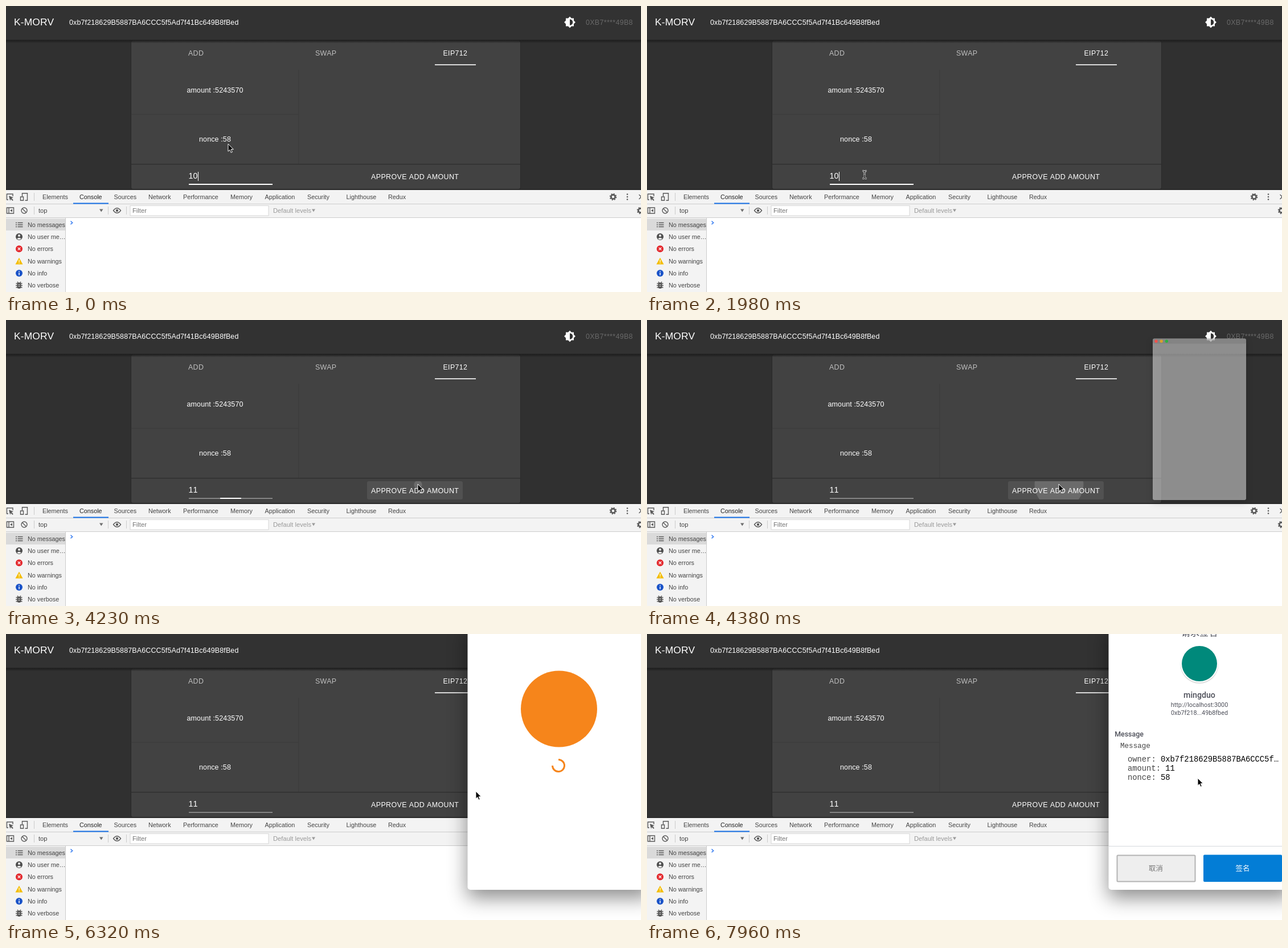
An HTML page for the animation above (8000 ms loop, 1115 px wide and 502 px high).

```html
<!DOCTYPE html>
<html lang="en">
<head>
<meta charset="utf-8">
<title>Token approval demo</title>
<style>
html, body { margin: 0; width: 100%; height: 100%; overflow: hidden; background: #303030; }
svg { display: block; width: 1115px; height: 502px; }
text { font-family: "Liberation Sans", Arial, sans-serif; white-space: pre; }
.body { font-size: 12.5px; letter-spacing: .00938em; fill: #fff; }
.btn { font-size: 12.4px; letter-spacing: .02857em; fill: #fff; }
.dev { font-size: 10.8px; fill: #444; }
.robo { font-family: Roboto, sans-serif; fill: #4d4f59; text-anchor: middle; }
.mono { font-family: "Liberation Mono", "Courier New", monospace; fill: #444; }
.cjk { font-family: "Noto Sans CJK SC", "Noto Sans CJK", sans-serif; text-anchor: middle; font-weight: 500; }
.line { fill: none; stroke: #5a5a5a; stroke-width: 1.4; }
#popup { filter: drop-shadow(0 14px 17px rgba(0,0,0,.45)); }
#ghost { filter: drop-shadow(0 5px 6px rgba(0,0,0,.3)); }
</style>
</head>
<body>
<svg id="stage" viewBox="0 0 1115 502" xmlns="http://www.w3.org/2000/svg"></svg>
<script>
const LOOP = 8000;
const ADDRESS = "0xb7f218629B5887BA6CCC5f5Ad7f41Bc649B8fBed";

// Screen refreshes: [first, last, count]
const BURSTS = [
  [0, 0, 1], [150, 780, 5], [1080, 1980, 7], [2580, 2580, 1], [2880, 3780, 7],
  [3930, 4380, 4], [4680, 4680, 1], [4950, 5870, 6], [6020, 7060, 8], [7210, 7960, 6]
];

// Pointer path: [time, x, y]
const PATH = [
  [0, 390, 242], [150, 390, 235], [400, 389, 190], [640, 387, 153], [780, 387, 148],
  [1080, 386, 153], [1400, 383, 198], [1750, 382, 274], [1980, 382, 296],
  [3100, 382, 296], [3330, 440, 316], [3480, 560, 321], [3630, 676, 313],
  [3780, 716, 304], [3930, 722, 291], [4080, 723, 288], [5130, 723, 288],
  [5500, 780, 284], [5870, 822, 278], [6320, 825, 276], [6620, 825, 276],
  [7060, 838, 280], [7210, 888, 281], [7360, 924, 277], [7510, 940, 262],
  [7660, 952, 246], [7810, 961, 241], [7960, 967, 253]
];

const rect = (x, y, w, h, fill, extra = "") =>
  `<rect x="${x}" y="${y}" width="${w}" height="${h}" fill="${fill}" ${extra}/>`;
const circle = (x, y, r, fill, extra = "") =>
  `<circle cx="${x}" cy="${y}" r="${r}" fill="${fill}" ${extra}/>`;
const text = (x, y, cls, str, extra = "") =>
  `<text x="${x}" y="${y}" class="${cls}" ${extra}>${str}</text>`;
const path = (d, extra = 'class="line"') => `<path d="${d}" ${extra}/>`;
const group = (id, inner) => `<g id="${id}">${inner}</g>`;

const gear = (x, y) =>
  circle(x, y, 3.6, "none", 'stroke="#5a5a5a" stroke-width="2.6"') +
  circle(x, y, 5.4, "none", 'stroke="#5a5a5a" stroke-width="1.8" stroke-dasharray="2.12"');

const defs = `<defs>
  <linearGradient id="fall" x2="0" y2="1"><stop stop-color="#000" stop-opacity=".42"/><stop offset="1" stop-color="#000" stop-opacity="0"/></linearGradient>
  <clipPath id="inButton"><rect x="634" y="283" width="168" height="32" rx="3"/></clipPath>
</defs>`;

function header() {
  return rect(0, 0, 1115, 60, "#323232") +
    rect(0, 59.5, 1115, 6, "url(#fall)") +
    text(14, 34, "body", "K-MORV", 'style="font-size:17.4px"') +
    text(111, 33, "body", ADDRESS) +
    path("M20 15.31L23.31 12 20 8.69V4h-4.69L12 .69 8.69 4H4v4.69L.69 12 4 15.31V20h4.69L12 23.31 15.31 20H20zM12 18V6a6 6 0 0 1 0 12z",
      'fill="#fff" transform="translate(979.5 18) scale(.875)"') +
    text(1018, 33, "btn", "0XB7****49B8", 'style="fill:#696969"');
}

function card() {
  return rect(219, 61, 685, 261, "#292929", 'rx="4"') +
    rect(220, 61, 683, 260, "#424242", 'rx="3"') +
    rect(220, 61, 683, 4, "url(#fall)", 'opacity=".5"') +
    text(320, 87.3, "btn", "ADD", 'style="fill:#c0c0c0"') +
    text(543, 87.3, "btn", "SWAP", 'style="fill:#c0c0c0"') +
    text(767.5, 87.3, "btn", "EIP712") +
    rect(753, 102.4, 72, 1.6, "#fff") +
    rect(513, 112, 1.4, 165, "#3d3d3d") +
    rect(220, 189.5, 293, 1.4, "#3d3d3d") +
    text(317.5, 152, "body", "amount :5243570") +
    text(339, 238.3, "body", "nonce :58") +
    rect(220, 277, 683, 1.4, "#2f2f2f") +
    text(320.5, 303, "body", "10", 'id="amount" style="font-size:14.3px;letter-spacing:0;font-kerning:none"') +
    rect(337, 291, 1, 16, "#fff", 'id="caret"') +
    rect(321, 312.6, 147, 1, "#c6c6c6") +
    rect(321, 312, 147, 2, "#fff", 'id="focus"') +
    rect(634, 283, 168, 32, "#515151", 'rx="3" id="hover"') +
    circle(723.5, 289, 43, "#fff", 'id="ripple" opacity=".15" clip-path="url(#inButton)"') +
    text(641, 304, "btn", "APPROVE ADD AMOUNT", 'style="font-size:12.5px;font-kerning:none"');
}

function devtools() {
  const tabs = [[64, "Elements"], [129, "Console"], [189.5, "Sources"], [250, "Network"], [311, "Performance"],
    [394, "Memory"], [454.5, "Application"], [529, "Security"], [597.5, "Lighthouse"], [671, "Redux"]];
  const rows = ["No messages", "No user me…", "No errors", "No warnings", "No info", "No verbose"];
  const rowY = i => 383.7 + i * 21.3;
  const small = 'style="font-size:11.2px"';
  return rect(0, 321, 1115, 2, "#2a2a2a") +
    rect(0, 323, 1115, 179, "#fff") +
    rect(0, 323, 1115, 48.5, "#f3f3f3") +
    rect(0, 347, 1115, 1, "#cdcdcd") +
    rect(0, 371, 1115, 1, "#cdcdcd") +
    rect(118, 345.5, 62, 2, "#1a73e8") +
    tabs.map(([x, s]) => text(x, 339, "dev", s, s === "Console" ? 'style="fill:#222"' : "")).join("") +
    // toolbar icons
    path("M1 330h11v4M1 340h3M1.5 330v10") +
    path("M5 333l8 3.2-3.2 1.4 3 3-1.4 1.4-3-3-1.2 3z", 'fill="#5a5a5a"') +
    path("M28.5 334v-5.3h9v12.6h-4M25.5 335h5v6.3h-5z") +
    rect(49, 328, 1, 14, "#ccc") +
    gear(1066, 335) +
    [330.5, 335, 339.5].map(y => circle(1091, y, 1.3, "#5a5a5a")).join("") +
    path("M1111.5 331l8 8M1119.5 331l-8 8") +
    path("M1.5 354h12v10h-12zM5 354v10") +
    path("M11 356.5v5l-4-2.5z", 'fill="#5a5a5a"') +
    circle(32, 359, 5, "none", 'class="line"') + path("M28.5 355.5l7 7") +
    [49, 179, 211].map(x => rect(x, 352, 1, 14, "#ccc")).join("") +
    text(57, 363, "dev", "top", small) +
    path("M164 356.5h6.5l-3.25 5z", 'fill="#6e6e6e"') +
    path("M188.5 359q6.5-8.5 13 0q-6.5 8.5-13 0z") + circle(195, 359, 2.2, "#5a5a5a") +
    rect(218, 350.5, 243, 17.5, "#fff", 'stroke="#d6d6d6"') +
    text(222, 363, "dev", "Filter", 'style="font-size:11.2px;fill:#757575"') +
    text(469, 363, "dev", "Default levels", 'style="font-size:11.2px;fill:#9a9a9a"') +
    path("M537 356.5h6l-3 5z", 'fill="#9a9a9a"') +
    gear(1114, 359) +
    // sidebar
    rect(0, 372, 104, 130, "#f3f3f3") + rect(0, 373.5, 104, 20.5, "#dadada") +
    rect(104, 372, 1, 130, "#ccc") +
    rows.map((s, i) => text(38, rowY(i) + 4, "dev", s)).join("") +
    path("M17 380.5h2M20.5 380.5h9M17 384h2M20.5 384h9M17 387.5h2M20.5 387.5h9") +
    circle(23, rowY(1), 6, "#4f4f4f") + circle(23, rowY(1) - 2, 2, "#f3f3f3") +
    path("M19.2 408.5q3.8-3.5 7.6 0q-3.8 3.2-7.6 0z", 'fill="#f3f3f3"') +
    circle(23, rowY(2), 6, "#e3282d") +
    path("M20.7 424l4.6 4.6M25.3 424l-4.6 4.6", 'stroke="#fff" stroke-width="1.3"') +
    path("M23 441.7l6.5 11.8h-13z", 'fill="#f4bd00"') +
    rect(22.4, 445.5, 1.3, 4, "#fff") + rect(22.4, 450.6, 1.3, 1.3, "#fff") +
    circle(23, rowY(4), 6, "#1a53c8") +
    rect(22.3, 468, 1.5, 4.5, "#fff") + rect(22.3, 465.3, 1.5, 1.5, "#fff") +
    path("M17.5 487h11M17 490.5h12M17.5 494h11M20 484l1.5 2M26 484l-1.5 2") +
    rect(19.5, 485.5, 7, 10.5, "#4f4f4f", 'rx="3.5"') +
    path("M21.5 489h3M21.5 492h3", 'stroke="#f3f3f3"') +
    path("M113.5 377.5l3.2 2.9-3.2 2.9", 'fill="none" stroke="#367cf1" stroke-width="1.5"');
}

function ghostWindow() {
  const lights = ["#f0524c", "#d9a02f", "#2fb043"];
  return rect(888, 32.5, 164, 283.5, "#fff", 'rx="3" fill-opacity=".47"') +
    rect(888, 32.5, 164, 9, "#777", 'rx="3" fill-opacity=".45"') +
    lights.map((c, i) => circle(894 + i * 9.2, 37.3, 2.7, c)).join("");
}

function message() {
  const field = (y, key, value) =>
    text(844, y, "mono", `${key}: <tspan fill="#000">${value}</tspan>`, 'style="font-size:13.8px"');
  return text(970, 3, "cjk", "请求签名", 'font-size="16" fill="#4d4f59"') +
    circle(970, 53.5, 33.5, "#000", 'opacity=".13"') +
    circle(970, 52, 33, "#fff") + circle(970, 52, 31, "#00897b") +
    text(970, 112, "robo", "mingduo", 'font-size="14.2" font-weight="500"') +
    text(970, 127.5, "robo", "http://localhost:3000", 'font-size="10.8"') +
    text(970, 141.5, "robo", "0xb7f218...49b8fbed", 'font-size="10.8"') +
    text(846.5, 179.5, "robo", "Message", 'font-size="12.4" font-weight="500"') +
    text(831, 200, "mono", "Message", 'font-size="12.6"') +
    field(224, "owner", ADDRESS.slice(0, 24) + "…") +
    field(240, "amount", "11") + field(256, "nonce", "58") +
    rect(811, 372, 304, 1, "#d5d8dc") +
    rect(825.5, 388.5, 137, 46, "#eee", 'stroke="#b3b3b3" stroke-width="2" rx="1.5"') +
    text(893.5, 416, "cjk", "取消", 'font-size="12.4" fill="#777"') +
    rect(977, 387.5, 138, 47.5, "#037dd6", 'rx="2"') +
    text(1046, 416, "cjk", "签名", 'font-size="12.4" fill="#fff"');
}

function loader() {
  return circle(971, 131.5, 67, "#f6851b") +
    path("M7.4 -7.4A10.5 10.5 0 1 0 7.4 7.4", 'id="spin" fill="none" stroke="#f6851b" stroke-width="3"');
}

const arrow = path("M0 0V13.2L3 10.5L5.1 15.3L7.3 14.3L5.2 9.6H9.3Z",
  'id="arrow" fill="#000" stroke="#fff" stroke-width="1" stroke-linejoin="round"');
const beamShape = "M-3.5 -6.5Q0 -6.5 0 -4.5Q0 -6.5 3.5 -6.5M0 -5V5M-3.5 6.5Q0 6.5 0 4.5Q0 6.5 3.5 6.5M-1.5 2.5H1.5";
const beam = group("beam",
  path(beamShape, 'fill="none" stroke="#fff" stroke-width="2.8"') +
  path(beamShape, 'fill="none" stroke="#000" stroke-width="1.1"'));

document.getElementById("stage").innerHTML = defs + rect(0, 0, 1115, 502, "#303030") +
  card() + header() + devtools() +
  group("ghost", ghostWindow()) +
  group("popup", rect(810.5, -20, 322, 469, "#fff", 'rx="5"')) +
  group("loader", loader()) + group("message", message()) +
  group("pointer", arrow + beam);

const el = {};
document.querySelectorAll("svg [id]").forEach(n => el[n.id] = n);
const show = (id, on) => { el[id].style.display = on ? "" : "none"; };
const set = (id, name, value) => el[id].setAttribute(name, value);

function refreshTime(t) {
  let last = 0;
  for (const [a, b, n] of BURSTS) {
    if (t < a) break;
    const gap = n > 1 ? (b - a) / (n - 1) : 1;
    last = a + Math.min(n - 1, Math.floor((t - a) / gap + 1e-6)) * gap;
  }
  return last;
}

function pointerAt(t) {
  let i = 0;
  while (i < PATH.length - 2 && PATH[i + 1][0] <= t) i++;
  const [t0, x0, y0] = PATH[i], [t1, x1, y1] = PATH[i + 1];
  const k = Math.min(1, (t - t0) / (t1 - t0));
  return [x0 + (x1 - x0) * k, y0 + (y1 - y0) * k];
}

function caretOn(t) {
  if (t >= 2880) return t < 3630;
  return Math.floor((t + 420) / 600) % 2 === 0;
}

function draw(now) {
  const t = refreshTime(now);
  const [x, y] = pointerAt(t);
  const overInput = x > 320 && x < 468 && y > 285 && y < 315;
  set("pointer", "transform", `translate(${x} ${y})`);
  show("arrow", !overInput);
  show("beam", overInput);

  el.amount.textContent = t < 2880 ? "10" : t < 3025 ? "1" : "11";
  set("caret", "x", t >= 2880 && t < 3025 ? 329 : 337);
  show("caret", caretOn(t));

  // focus underline shrinks to its middle after the click
  const k = Math.min(1, Math.max(0, (t - 4130) / 200));
  const w = 147 * (1 - k) ** 2;
  set("focus", "x", 394.5 - w / 2);
  set("focus", "width", w);

  show("hover", t > 3700 && x < 802 && t < 6000);
  show("ripple", t >= 4200 && t < 4600);
  set("ripple", "r", Math.max(0, 43 * Math.min(1, (t - 4200) / 180)));

  const loaded = t >= 6600;
  show("ghost", t >= 4375 && t < 4680);
  show("popup", t >= 4680);
  show("loader", t >= 4680 && !loaded);
  show("message", loaded);
  set("spin", "transform", `translate(970 231) rotate(${(t - 4680) * .36 - 4})`);
}

const start = performance.now();
function tick() {
  draw((performance.now() - start) % LOOP);
  requestAnimationFrame(tick);
}
tick();
</script>
</body>
</html>
```
